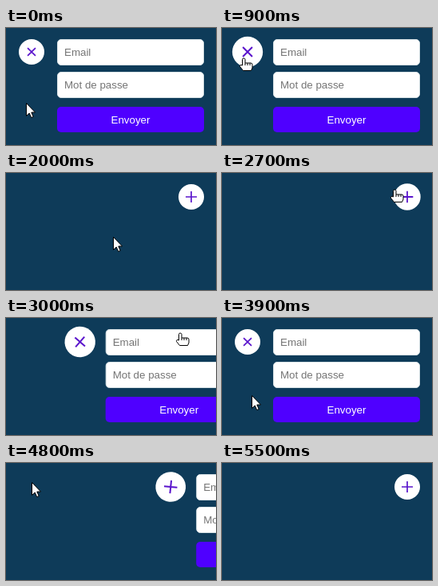
Recreate the animation shown at these times as an HTML page. Size 263 by 147 pixels, loop 6500 ms.

```html
<!DOCTYPE html>
<html lang="fr">
<head>
<meta charset="utf-8">
<style>
  html, body { margin: 0; width: 100%; height: 100%; overflow: hidden; background: #0e3b59; }
  svg { display: block; width: 100vw; height: 100vh; }
  text { font: 13.333px "Liberation Sans", Arial, sans-serif; fill: #757575; }
  .field { fill: #fff; stroke: #d8e2e6; }
  .cursor { fill: #fff; stroke: #000; stroke-linejoin: round; }
</style>
</head>
<body>
<svg viewBox="0 0 263 147">
  <g id="panel">
    <rect class="field" x="64.5" y="14.5" width="183" height="32" rx="4.5"/>
    <text x="73" y="35">Email</text>
    <rect class="field" x="64.5" y="55.5" width="183" height="32" rx="4.5"/>
    <text x="73" y="76">Mot de passe</text>
    <rect x="64" y="99" width="184" height="32" rx="5" fill="#4f00ff"/>
    <text x="156" y="120" text-anchor="middle" style="fill:#fff">Envoyer</text>
  </g>
  <g id="toggle">
    <circle r="16" fill="#fff"/>
    <path d="M-7 0H7M0-7V7" stroke="#5a14cc" stroke-width="1.7"/>
  </g>
  <path id="arrow" class="cursor" d="M.5.5V16.5L4.2 13 6.7 18.6 9.2 17.5 6.8 12H11.5Z"/>
  <g id="hand" class="cursor">
    <path d="M-1.5 9V1.5Q-1.5 0 .2 0T2 1.5V6H9Q11 6 11 8V12L9.5 15.5H-.5L-4.5 10.5Q-5 7.5-1.5 9Z"/>
    <path d="M2 6V9M5 6V9M8 6V9" fill="none"/>
  </g>
</svg>
<script>
const LOOP = 6500, STEP = 100, END = 5500;
const SLIDE = 400, TURN_BACK = 250, ZOOM = 300, MOVE = 300, LINGER = 200, TRAVEL = 200;
const [panel, toggle, arrow, hand] =
  ["panel", "toggle", "arrow", "hand"].map(id => document.getElementById(id));

// Pointer stops: arrival time, x, y; each trip takes at most MOVE
const stops = [
  [0, 25, 94], [850, 27, 38], [1400, 26, 37], [1800, 64, 108], [2000, 134, 80],
  [2450, 212, 25], [2800, 218, 19], [3600, 50, 104], [3900, 37, 97],
  [4250, 28, 38], [4800, 32, 24], [5400, 123, 82]
];
// Visits to the round button; clicks hide and show the panel in turn
const visits = [
  { enter: 640, click: 1294 },
  { enter: 2650, click: 2836 },
  { enter: 4230, click: 4568 }
];

const clamp = v => Math.max(0, Math.min(1, v));

// CSS "ease": cubic-bezier(.25, .1, .25, 1)
function ease(x) {
  if (x <= 0 || x >= 1) return clamp(x);
  const curve = (a, b, s) => 3 * a * s * (1 - s) ** 2 + 3 * b * s * s * (1 - s) + s ** 3;
  let lo = 0, hi = 1;
  for (let i = 0; i < 20; i++) {
    const mid = (lo + hi) / 2;
    if (curve(.25, .25, mid) < x) lo = mid; else hi = mid;
  }
  return curve(.1, 1, lo);
}

function pointerAt(t) {
  let [last, x, y] = stops[0];
  for (const [at, nx, ny] of stops.slice(1)) {
    const from = Math.max(last, at - MOVE);
    const k = clamp((t - from) / (at - from));
    x += (nx - x) * k;
    y += (ny - y) * k;
    last = at;
  }
  return `translate(${x} ${y})`;
}

function draw(t) {
  let hidden = 0, turn = 1, zoom = 1, over = false;
  visits.forEach(({ enter, click }, i) => {
    const hides = i % 2 === 0, sign = hides ? 1 : -1, leave = click + LINGER;
    hidden += sign * ease((t - click) / SLIDE);
    turn -= sign * ease((t - click) / (hides ? SLIDE : TURN_BACK));
    zoom += .2 * (ease((t - enter) / ZOOM) - ease((t - leave) / ZOOM));
    over ||= t >= enter && t < leave;
  });

  const shift = TRAVEL * hidden;
  panel.setAttribute("transform", `translate(${shift})`);
  toggle.setAttribute("transform",
    `translate(${32 + shift} 30) scale(${zoom}) rotate(${45 * turn})`);

  const place = pointerAt(t);
  for (const [el, shown] of [[arrow, !over], [hand, over]]) {
    el.setAttribute("transform", place);
    el.setAttribute("visibility", shown && t < END ? "visible" : "hidden");
  }
}

const start = performance.now();
function tick() {
  const t = (performance.now() - start) % LOOP;
  draw(Math.floor(t / STEP) * STEP);
  requestAnimationFrame(tick);
}
tick();
</script>
</body>
</html>
```
